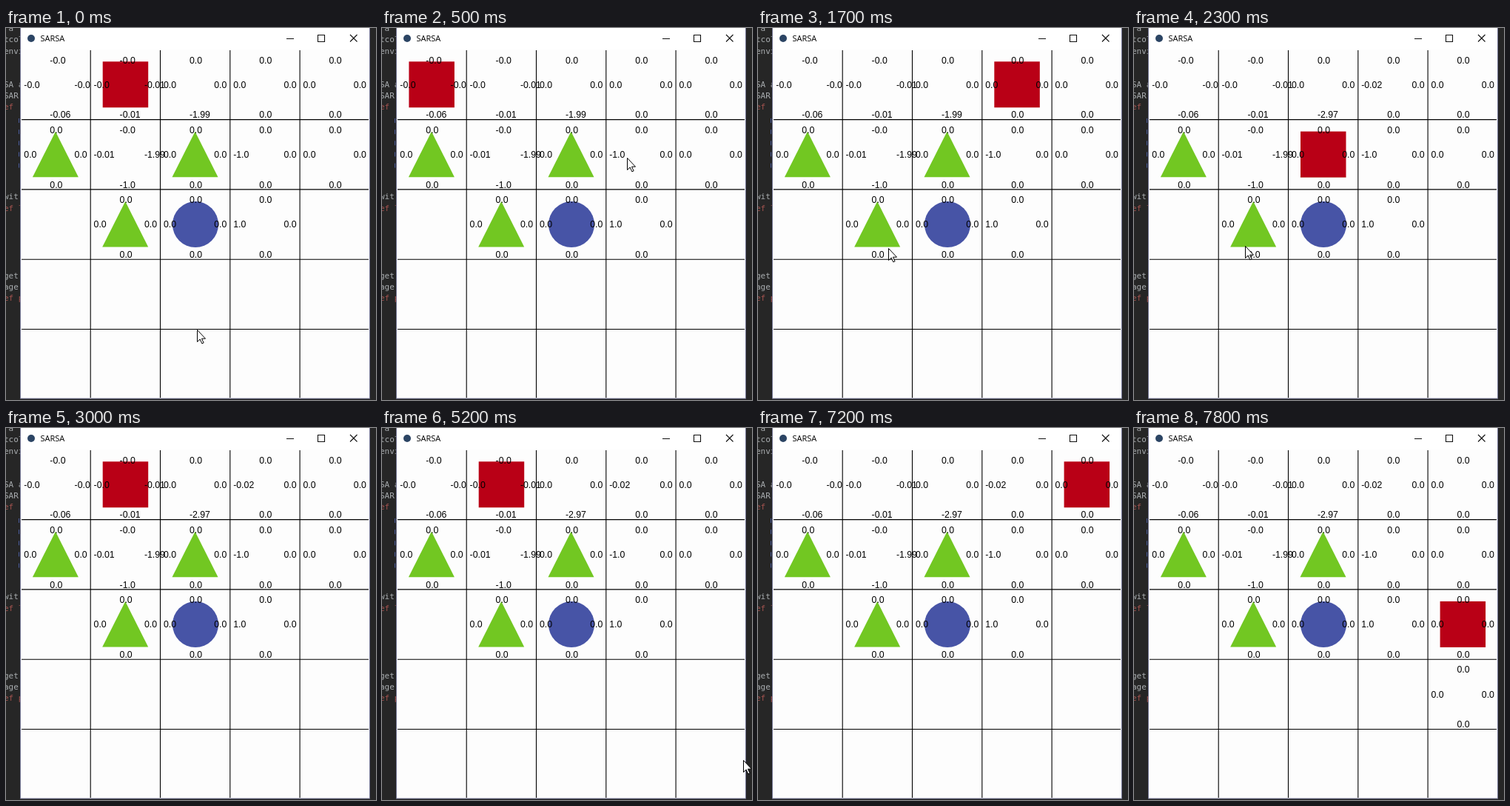
Write an HTML page that moves like this. It is 500 px wide and 502 px high and loops after 7900 ms.

```html
<!DOCTYPE html>
<html lang="en">
<head>
<meta charset="utf-8">
<title>SARSA</title>
<style>
html, body { margin: 0; width: 100%; height: 100%; overflow: hidden; background: #262626; }
svg { display: block; width: 500px; height: 502px; }
.code { font: 11px "DejaVu Sans Mono", monospace; fill: #a9adb0; white-space: pre; }
.title { font: 11px "Open Sans", sans-serif; }
.q { font: 12.3px "Liberation Sans", Arial, sans-serif; }
.btn { fill: none; stroke: #111; stroke-width: 1.1; }
.grid { stroke: #000; stroke-width: 1.1; }
</style>
</head>
<body>
<svg id="stage" viewBox="0 0 500 502">
  <rect width="500" height="502" fill="#262626"/>
  <g id="code" class="code"></g>
  <rect x="19" width="473" height="500.5" fill="#7b7d9c"/>
  <rect x="20" width="471" height="499.5" fill="#fdfdfd"/>
  <rect x="20" width="471" height="29" fill="#fff"/>
  <circle cx="34" cy="14" r="5" fill="#2c4564"/>
  <text class="title" x="46.5" y="18">SARSA</text>
  <path class="btn" d="M379 14.5h10M421.5 9.5h9v9h-9zM465 9l9.5 9.5M474.5 9l-9.5 9.5"/>
  <path id="grid" class="grid"/>
  <g id="shapes"></g>
  <rect id="agent" width="61.5" height="62" fill="#b90016"/>
  <g id="values" class="q"></g>
  <path id="cursor" d="M.5.5v16l3.7-3.5 2.6 5.8 2.3-1-2.6-5.6h5z" fill="#fff" stroke="#000"/>
</svg>
<script>
const LOOP = 7900, FRAME = 100, CELL = 94.3;
const $ = id => document.getElementById(id);
const left = col => 19.9 + col * CELL;
const top_ = row => 29.3 + row * CELL;

function add(parent, tag, attrs, text = "") {
  const el = document.createElementNS("http://www.w3.org/2000/svg", tag);
  for (const k in attrs) el.setAttribute(k, attrs[k]);
  el.textContent = text;
  $(parent).append(el);
  return el;
}

// Editor behind the window; each / ends a line
" ra/tcol/envi///SA a/ SAR/ef ////////wit/ef l///////get/ age/ef p".replace("wit", " wit")
  .replace("//get", "/ get").split("/").forEach((s, i) => add("code", "text",
    { x: -3, y: 4.2 + 15.15 * i, fill: s.startsWith("ef") ? "#a3534f" : "#a9adb0" }, s));
for (let i = 0; i < 5; i++) {
  add("code", "rect", { x: 17, y: 122 + 15.15 * i, width: 1, height: 6, fill: "#4a5c9c" });
}

// Board
let lines = "";
for (let i = 1; i < 5; i++) lines += `M${left(i)} 30V499M21 ${top_(i)}H490`;
$("grid").setAttribute("d", lines);

function triangle(row, col) {
  const d = `M${left(col) + 47} ${top_(row) + 16.2}l31 61.5h-62z`;
  add("shapes", "path", { d, fill: "#72c722" });
}
triangle(1, 0);
triangle(1, 2);
triangle(2, 1);
add("shapes", "circle", { cx: left(2) + 47.5, cy: top_(2) + 47.2, r: 31, fill: "#4754a6" });

// The agent's runs: start time, first cell, time per move, moves
const RUNS = [
  { at: 100, row: 0, col: 1, pace: 300, moves: "LRDUR" },
  { at: 1600, row: 0, col: 2, pace: 100, moves: "RLD" },
  { at: 2400, row: 0, col: 0, pace: 400, moves: "R" },
  { at: 6540, row: 0, col: 1, pace: 180, moves: "RRRDDDU" }
];

function agentAt(t) {
  const run = RUNS.filter(r => r.at <= t).pop() || RUNS[0];
  const done = run.moves.slice(0, Math.max(0, Math.floor((t - run.at) / run.pace)));
  const count = c => done.split(c).length - 1;
  return [run.row + count("D") - count("U"), run.col + count("R") - count("L")];
}

// Action values of each state: up, down, left, right
const KNOWN = {
  "0,0": "-0.0 -0.06 -0.0 -0.0", "0,1": "-0.0 -0.01 -0.0 -0.01",
  "0,2": "0.0 -1.99 0.0 0.0", "1,1": "-0.0 -1.0 -0.01 -1.99",
  "1,3": "0.0 0.0 -1.0 0.0", "2,3": "0.0 0.0 1.0 0.0"
};
const MID = 39.4, NEAR = 4.4, FAR = 72.7;
const SPOTS = [[MID, 18.2], [MID, 92], [NEAR, 51.3], [FAR, 51.3]];
const labels = {};

function label(row, col) {
  const key = [row, col];
  const vals = (KNOWN[key] || "0.0 0.0 0.0 0.0").split(" ");
  labels[key] = SPOTS.map(([x, y], i) =>
    add("values", "text", { x: left(col) + x, y: top_(row) + y }, vals[i]));
}
for (let col = 0; col < 5; col++) {
  label(0, col);
  label(1, col);
  if (col) label(2, col);
}
label(3, 4);

// Pointer waypoints [time, x, y]; it is hidden between the two paths
const PATHS = [
  [[0, 258, 407], [400, 390, 180], [800, 12, 150], [1200, 287, 303],
   [1700, 176, 297], [2100, 165, 321], [2900, 70, 150]],
  [[3100, 70, 130], [3700, 318, 286], [4500, 290, 90],
   [5200, 488, 448], [5700, 340, 80], [6400, 405, 320]]
];

function pointerAt(t) {
  const path = PATHS.find(p => t >= p[0][0] && t <= p[p.length - 1][0]);
  if (!path) return null;
  const i = Math.max(1, path.findIndex(p => p[0] >= t));
  const [a, b] = [path[i - 1], path[i]];
  const k = (t - a[0]) / (b[0] - a[0]);
  const ease = k * k * (3 - 2 * k);
  return [1, 2].map(j => Math.round(a[j] + (b[j] - a[j]) * ease));
}

const show = (el, on) => el.setAttribute("visibility", on ? "visible" : "hidden");

function draw(now) {
  const t = Math.floor(now % LOOP / FRAME) * FRAME;
  const [row, col] = agentAt(t);
  $("agent").setAttribute("x", left(col) + 16.5);
  $("agent").setAttribute("y", top_(row) + 16);

  labels["0,3"][2].textContent = t < 1800 ? "0.0" : "-0.02";
  labels["0,2"][1].textContent = t < 1900 ? "-1.99" : "-2.97";
  // A state gets its values on the first visit
  labels["2,4"].forEach(el => show(el, t > 7400));
  labels["3,4"].forEach(el => show(el, t > 7600));

  const at = pointerAt(t);
  show($("cursor"), at);
  if (at) $("cursor").setAttribute("transform", `translate(${at})`);
}

const start = performance.now();
function tick() {
  draw(performance.now() - start);
  requestAnimationFrame(tick);
}
draw(0);
requestAnimationFrame(tick);
</script>
</body>
</html>
```
